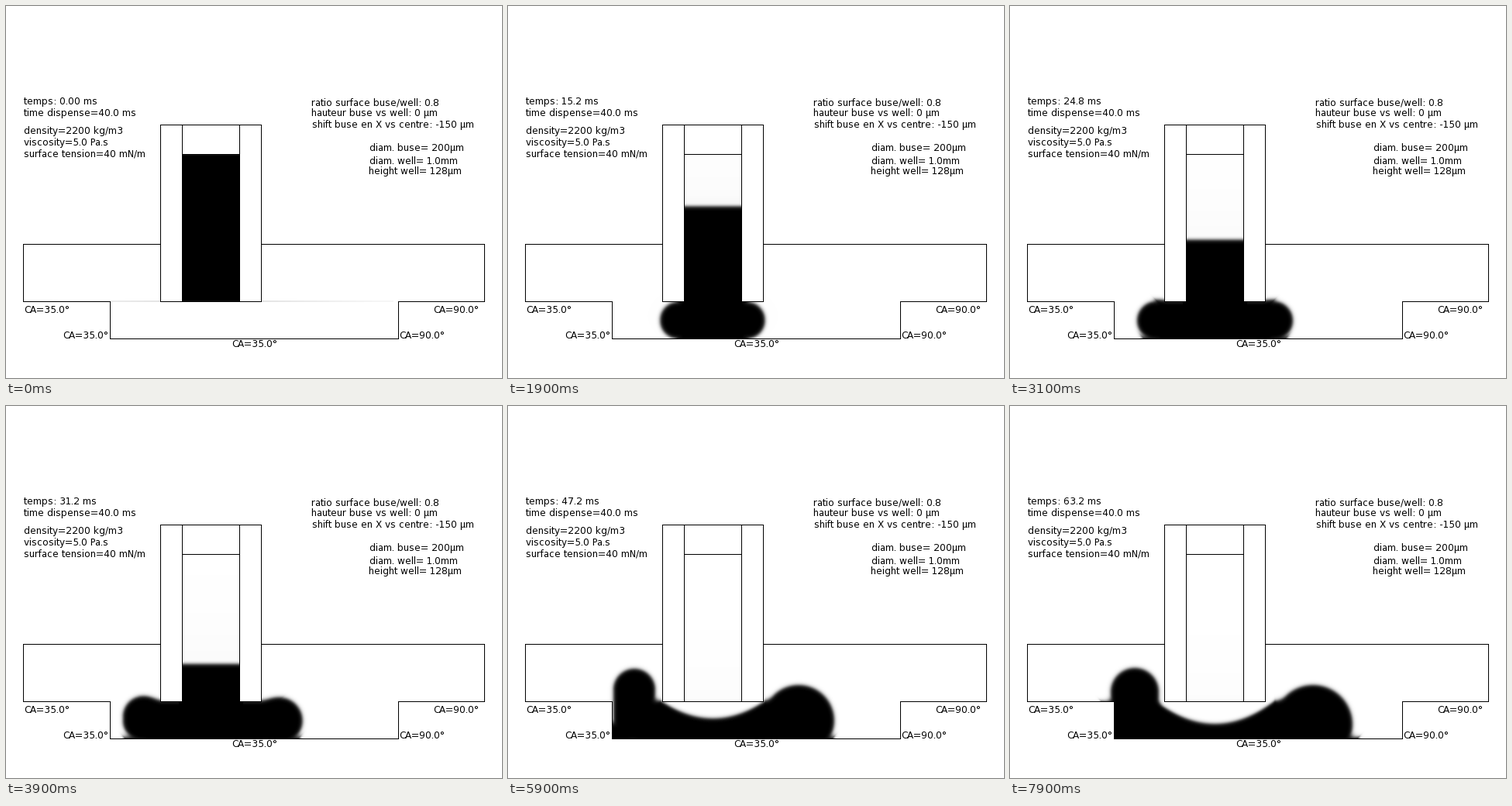
Animation of 640x480 px, one loop 8000 ms. Source, as a matplotlib script:

```python
import numpy as np
import matplotlib.pyplot as plt
from matplotlib.animation import FuncAnimation
from matplotlib.patches import Rectangle

W, H, DPI = 640, 480, 100
FRAMES, STEP = 80, 100
MS_PER_FRAME = 0.8
# Whole-pixel glyph advances without kerning
plt.rcParams.update({"font.family": "DejaVu Sans", "text.hinting_factor": 1,
                     "text.kerning_factor": 6})

MID = 264        # nozzle axis
TIP = 381        # nozzle tip height
TOUCH = 10       # step at which the drop meets the floor

# Height of the liquid on the nozzle axis
LEVEL_AT = [0, 31, 50, 59, 79]
LEVEL = [192, 301.5, 375, 403, 410]

# Lobes as x, y, radius, foot on each side, then the height wetted on the left wall
POSE_AT = [TOUCH, 31, 50, 59, 79]
POSES = [
    (247, 404, 22, 264, 281, 404, 22, 264, 445),
    (189, 406, 25, 171, 340, 406, 25, 357, 445),
    (167, 385, 28, 134, 366, 406, 40, 403, 432),
    (163, 366, 27, 125, 375, 406, 46, 420, 409),
    (161, 369, 31, 110, 391, 411, 51, 450, 381),
]

X0, X1, Y0, Y1 = 60, 500, 185, 430
X, Y = np.meshgrid(np.arange(X0, X1) + 0.5, np.arange(Y0, Y1) + 0.5)
DX = X - MID - 0.5
BORE = (X > 227) & (X < 302) & (Y > 191) & (Y < 382)
CHAMBER = (Y > 307) & (Y < 382) & ((X < 199) | (X > 329))
WELL = (X > 134) & (X < 507) & (Y > 381)
DOMAIN = BORE | CHAMBER | WELL


def smooth(x, xs, ys):
    """Monotone cubic interpolation between key values."""
    xs, ys = np.asarray(xs, float), np.asarray(ys, float)
    h = np.diff(xs)
    d = (np.diff(ys, axis=0).T / h).T
    a, b = d[:-1], d[1:]
    same = a * b > 0
    inner = np.where(same, 2 * a * b / np.where(same, a + b, 1), 0)
    m = np.concatenate([d[:1], inner, d[-1:]])
    i = np.clip(np.searchsorted(xs, x, "right") - 1, 0, len(h) - 1)
    u = (x - xs[i]) / h[i]
    v = 1 - u
    return (ys[i] * v * v * (1 + 2 * u) + ys[i + 1] * u * u * (3 - 2 * u)
            + h[i] * u * v * (v * m[i] - u * m[i + 1]))


def box(left, right, top, bottom=460):
    return np.maximum(np.maximum(left - X, X - right), np.maximum(top - Y, Y - bottom))


def lobe(x, y, r):
    """Disc stretched down to the lower part of the well."""
    stem = np.clip(Y, y, max(y, 406))
    return np.hypot(X - x, Y - stem) - r


def merge(a, b, k=7):
    """Union with a rounded fillet."""
    return np.minimum(a, b) - np.clip(k - abs(a - b), 0, None) ** 2 / (4 * k)


def distance(k, surface):
    """Signed distance to the liquid, negative inside."""
    depth = np.clip(4.5 * k, 0.1, 44)
    drop = (np.hypot(DX / 40, (Y - TIP) / depth) - 1) * depth
    core = np.minimum(np.maximum(abs(DX) - 42, Y - TIP), drop)
    top = np.where(abs(DX) < 42, surface, np.maximum(surface, TIP - 1))
    if k < TOUCH:
        return np.maximum(core, top - Y)

    lx, ly, lr, lfoot, rx, ry, rr, rfoot, creep = smooth(k, POSE_AT, POSES)
    core = np.minimum(core, np.maximum(lx - X, X - rx))
    d = np.maximum(core, top - Y)
    for part in (lobe(lx, ly, lr), lobe(rx, ry, rr),
                 box(lfoot, rfoot, 427), box(118, 160, creep)):
        d = merge(d, part)
    return d


def fluid(k):
    level = smooth(k, LEVEL_AT, LEVEL)
    surface = level - 0.005 * np.clip((k - 44) / 6, 0, 1) * DX ** 2
    edge = min(2.75, 0.4 + 0.4 * k)
    ink = 0.5 - 0.5 * np.tanh(distance(k, surface) / edge)

    # Thin residue above the column and around the drop
    gap = np.clip(level - Y, 0, None)
    film = 0.02 * np.exp(-gap / 70) + 0.12 * max(0, 1 - k / 31) * np.exp(-gap / 5)
    cloud = 0.007 * np.exp(-(DX / 110) ** 2 - ((Y - 400) / 60) ** 2)
    haze = min(1, k / 8) * np.where(BORE, film, cloud)
    return np.where(DOMAIN, np.maximum(ink, haze), 0)


fig = plt.figure(figsize=(W / DPI, H / DPI), dpi=DPI, facecolor="white")
ax = fig.add_axes([0, 0, 1, 1])
ax.axis("off")
image = ax.imshow(np.zeros(X.shape), cmap="gray_r", vmin=0, vmax=1, aspect="auto",
                  extent=(X0, X1, Y1, Y0), interpolation="nearest", zorder=1)
ax.set_xlim(0, W)
ax.set_ylim(H, 0)


def line(*pts):
    ax.plot(*zip(*pts), color="black", lw=72 / DPI, antialiased=False,
            solid_capstyle="projecting", solid_joinstyle="miter", zorder=3)


def label(x, y, s):
    return ax.text(x, y, s, fontsize=12 * 72 / DPI, color="black",
                   ha="left", va="baseline", zorder=4)


for x in (199, 302):
    ax.add_patch(Rectangle((x, 153), 28, TIP - 153, fc="white", ec="none", zorder=2))

line((199, 307), (22, 307), (22, 381), (134, 381), (134, 429),
     (506, 429), (506, 381), (617, 381), (617, 307), (329, 307))
line((199, 153), (329, 153), (329, 381), (199, 381), (199, 153))
line((227, 153), (227, 381))
line((301, 153), (301, 381))
line((227, 191), (301, 191))

clock = label(23, 127, "")
for x, y, s in [
    (23, 142, "time dispense=40.0 ms"),
    (23, 165, "density=2200 kg/m3"),
    (23, 180, "viscosity=5.0 Pa.s"),
    (23, 195, "surface tension=40 mN/m"),
    (394, 128, "ratio surface buse/well: 0.8"),
    (394, 142, "hauteur buse vs well: 0 µm"),
    (395, 157, "shift buse en X vs centre: -150 µm"),
    (469, 187, "diam. buse= 200µm"),
    (469, 204, "diam. well= 1.0mm"),
    (468, 217, "height well= 128µm"),
    (23, 396, "CA=35.0°"),
    (73, 429, "CA=35.0°"),
    (291, 440, "CA=35.0°"),
    (507, 429, "CA=90.0°"),
    (551, 396, "CA=90.0°"),
]:
    label(x, y, s)


def draw(k):
    t = k * MS_PER_FRAME
    clock.set_text(f"temps: {t:.{2 if t < 9.99 else 1}f} ms")
    image.set_data(fluid(k))
    return image, clock


anim = FuncAnimation(fig, draw, frames=FRAMES, interval=STEP, repeat=True, repeat_delay=0)
plt.show()
```
